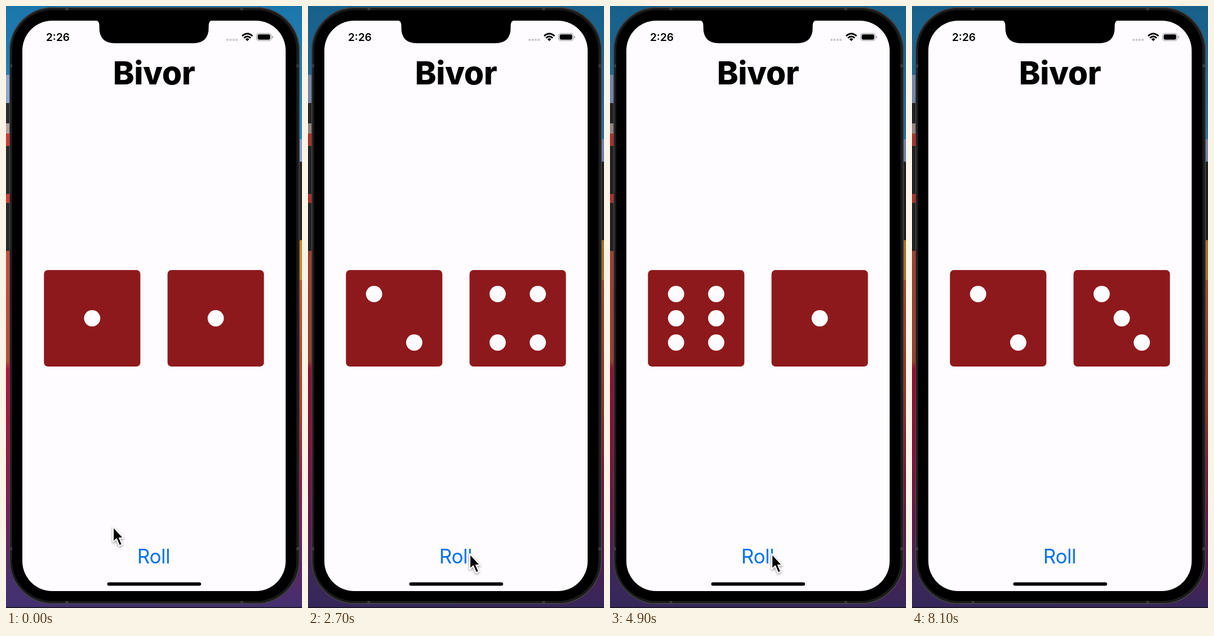
An HTML page for the animation above (8.2 s loop, 525 px wide and 1067 px high).

```html
<!DOCTYPE html>
<html lang="en">
<head>
<meta charset="utf-8">
<title>Dice app</title>
<style>
  html, body { margin: 0; width: 100%; height: 100%; overflow: hidden; background: #000; }
  svg { display: block; width: 100%; height: 100%; }
  text { font-family: Inter, "Open Sans", sans-serif; }

  .roll, .dim, .hide { animation: 8200ms step-end infinite; }
  .first { animation-name: first; }
  .second { animation-name: second; }
  .third { animation-name: third; }
  .dim { animation-name: dim; }
  .hide { animation-name: hide; }
  .pointer { animation: move 8200ms infinite; }

  @keyframes first { 0% { opacity: 1 } 21.95%, 100% { opacity: 0 } }
  @keyframes second { 0% { opacity: 0 } 21.95% { opacity: 1 } 40.24%, 100% { opacity: 0 } }
  @keyframes third { 0% { opacity: 0 } 40.24% { opacity: 1 } 67.07%, 100% { opacity: 0 } }
  .fourth { animation-name: fourth; }
  @keyframes fourth { 0% { opacity: 0 } 67.07%, 100% { opacity: 1 } }
  @keyframes dim { 0% { opacity: 0 } 17.07%, 100% { opacity: 1 } }
  @keyframes hide { 0% { opacity: 1 } 92.68%, 100% { opacity: 0 } }
  @keyframes move {
    0%, 1.2% { transform: translate(190px, 923px); animation-timing-function: ease-in-out }
    10%, 100% { transform: translate(287px, 971px) }
  }
</style>
</head>
<body>
<svg viewBox="0 0 525 1067" preserveAspectRatio="none">
  <defs>
    <linearGradient id="sky" x2="0" y2="1">
      <stop offset="0" stop-color="#1b76aa"/>
      <stop offset="1" stop-color="#3188c0"/>
    </linearGradient>
    <linearGradient id="dusk" x2="0" y2="1">
      <stop offset="0" stop-color="#c4503b"/>
      <stop offset=".31" stop-color="#bd4c39"/>
      <stop offset=".33" stop-color="#b9133b"/>
      <stop offset=".55" stop-color="#a51646"/>
      <stop offset=".78" stop-color="#702061"/>
      <stop offset=".92" stop-color="#48316f"/>
      <stop offset="1" stop-color="#42306f"/>
    </linearGradient>
    <linearGradient id="ember" x2="0" y2="1">
      <stop offset="0" stop-color="#cc5730"/>
      <stop offset=".4" stop-color="#b9382f"/>
      <stop offset=".6" stop-color="#981b47"/>
      <stop offset=".82" stop-color="#672263"/>
      <stop offset="1" stop-color="#42306f"/>
    </linearGradient>
    <g id="die">
      <rect x="-85.5" y="-85.5" width="171" height="171" rx="7" fill="#8e191c"/>
    </g>
    <circle id="pip" r="14.4" fill="#fefcff"/>
    <g id="one"><use href="#die"/><use href="#pip"/></g>
    <g id="pair"><use href="#pip" x="-35.6" y="-43"/><use href="#pip" x="35.6" y="43"/></g>
    <g id="two"><use href="#die"/><use href="#pair"/></g>
    <g id="three"><use href="#two"/><use href="#pip"/></g>
    <g id="four"><use href="#two"/><use href="#pair" transform="scale(-1 1)"/></g>
    <g id="six"><use href="#four"/><use href="#pip" x="-35.6"/><use href="#pip" x="35.6"/></g>
  </defs>

  <!-- wallpaper -->
  <rect width="525" height="240" fill="url(#sky)"/>
  <g>
    <rect y="122" width="30" height="50" fill="#8ea5cf"/>
    <rect y="172" width="30" height="36" fill="#2b2b2e"/>
    <rect y="208" width="30" height="18" fill="#b5a09f"/>
    <rect y="226" width="30" height="208" fill="#d23c37"/>
    <rect y="248" width="30" height="85" fill="#2b2929"/>
    <rect y="349" width="30" height="85" fill="#2b2929"/>
    <rect y="434" width="262" height="633" fill="url(#dusk)"/>
  </g>
  <g>
    <rect x="495" y="236" width="30" height="40" fill="#8b9fcb"/>
    <rect x="495" y="276" width="30" height="139" fill="#272627"/>
    <rect x="495" y="415" width="30" height="71" fill="#cf8a2e"/>
    <rect x="262" y="486" width="263" height="581" fill="url(#ember)"/>
  </g>
  <rect class="dim" width="525" height="1067" fill="#000" fill-opacity=".19"/>
  <rect y="1065.5" width="525" height="1.5" fill="#15131c"/>

  <!-- phone -->
  <rect x="6" y="2" width="515" height="1058" rx="77" fill="#1b1b1c"/>
  <rect x="6.8" y="2.8" width="513.4" height="1056.4" rx="76" fill="none" stroke="#4a4a4b" stroke-width="1.4"/>
  <path d="M108 3v5M418 3v5M108 1054v5M418 1054v5M7 106h5M515 106h5M7 962h5M515 962h5" stroke="#3b3b3d" stroke-width="5"/>
  <rect x="11" y="7.5" width="504" height="1047" rx="71" fill="#000"/>
  <rect x="29" y="26" width="467" height="1011" rx="53" fill="#fefcff"/>
  <path d="M158 25Q165.500 26 165.500 34V38Q165.500 66 193 66H332Q359.500 66 359.500 38V34Q359.500 26 367 25Z" fill="#000"/>

  <!-- status bar -->
  <text x="71" y="62" font-size="19" font-weight="600">2:26</text>
  <g fill="#c5c4c7">
    <circle cx="393" cy="60" r="2"/><circle cx="398.400" cy="60" r="2"/>
    <circle cx="403.800" cy="60" r="2"/><circle cx="409.200" cy="60" r="2"/>
  </g>
  <g fill="none" stroke="#000" stroke-width="2.8">
    <path d="M418.800 53.200Q428 44.800 437.200 53.200"/>
    <path d="M422 56.800Q428 51.300 434 56.800"/>
  </g>
  <path d="M424.600 58.700Q428 55.900 431.400 58.700L428 62.200Z"/>
  <rect x="444.700" y="48.500" width="25.600" height="13" rx="4" fill="none" stroke="#98979a" stroke-width="1.200"/>
  <rect x="446.500" y="50.300" width="22" height="9.400" rx="2.400"/>
  <path d="M472 52.500Q474 53.200 474 55T472 57.500Z" fill="#98979a"/>

  <text x="262.500" y="139" font-size="57" font-weight="800" text-anchor="middle" letter-spacing="-.4">Bivor</text>

  <g class="roll first"><use href="#one" x="152.800" y="553.500"/><use href="#one" x="372" y="553.500"/></g>
  <g class="roll second"><use href="#two" x="152.800" y="553.500"/><use href="#four" x="372" y="553.500"/></g>
  <g class="roll third"><use href="#six" x="152.800" y="553.500"/><use href="#one" x="372" y="553.500"/></g>
  <g class="roll fourth"><use href="#two" x="152.800" y="553.500"/><use href="#three" x="372" y="553.500"/></g>

  <text x="262" y="988" font-size="35" fill="#0a72ee" text-anchor="middle" letter-spacing="-.4">Roll</text>
  <rect x="179.500" y="1021.500" width="166.500" height="6" rx="3"/>

  <g class="hide">
    <g class="pointer">
      <path d="M0 0V27L6 21.500L11 33.500L16 31.400L11 20H18.500Z" fill="#000" stroke="#fff" stroke-width="2" stroke-linejoin="round" style="filter:drop-shadow(0 2px 2px #0006)"/>
    </g>
  </g>
</svg>
</body>
</html>
```
